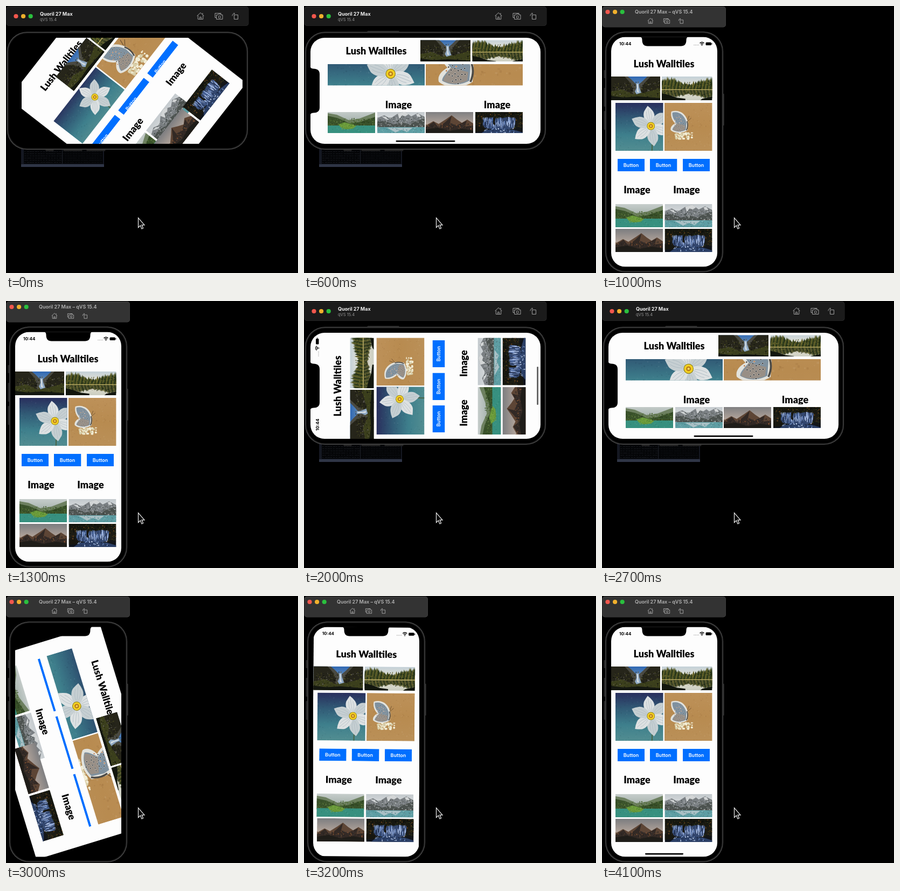
Animation of 542x496 px, one loop 4.4 s. Source, as an HTML page with a canvas:

```html
<!DOCTYPE html>
<html lang="en">
<head>
<meta charset="utf-8">
<title>Rotating phone layout</title>
<style>
html, body { margin: 0; width: 100%; height: 100%; overflow: hidden; background: #000; }
canvas { display: block; }
</style>
</head>
<body>
<canvas id="stage" width="542" height="496"></canvas>
<script>
const ctx = document.getElementById('stage').getContext('2d');
const LOOP = 4400, STEP = 100, TURN = 300;
const DEVICE = 'Quoril 27 Max', SYSTEM = 'qVS 15.4';
const TALL = { x: 115.5, y: 271 }, WIDE = { x: 225.5, y: 157.5 };

// Each phase turns the view; the home bar returns once it has settled.
const phases = [
  { at: 0, start: -135, wide: true, bar: 300 },
  { at: 700, start: 650, wide: false, bar: 1300 },
  { at: 2000, start: 2000, wide: true, bar: 2450 },
  { at: 3000, start: 2914, wide: false, bar: 3600 },
];

const lerp = (a, b, k) => a + (b - a) * k;
const clamp = v => Math.max(0, Math.min(1, v));
const ease = u => (1 - Math.cos(Math.PI * clamp(u))) / 2;

let seed = 1;
const random = () => (seed = seed * 16807 % 2147483647) / 2147483647;

function shape(fill, d) {
  ctx.fillStyle = fill;
  ctx.fill(new Path2D(d));
}

function line(color, width, d) {
  ctx.strokeStyle = color;
  ctx.lineWidth = width;
  ctx.stroke(new Path2D(d));
}

function box(fill, x, y, w, h, r = 0) {
  ctx.fillStyle = fill;
  ctx.beginPath();
  ctx.roundRect(x, y, w, h, r);
  ctx.fill();
}

function dot(fill, x, y, r) {
  ctx.fillStyle = fill;
  ctx.beginPath();
  ctx.arc(x, y, r, 0, 7);
  ctx.fill();
}

function text(str, x, y, font, color, align = 'left') {
  ctx.font = font + ', sans-serif';
  ctx.fillStyle = color;
  ctx.textAlign = align;
  ctx.fillText(str, x, y);
}

function group(draw) {
  ctx.save();
  draw();
  ctx.restore();
}

function clipBox(x, y, w, h) {
  ctx.beginPath();
  ctx.rect(x, y, w, h);
  ctx.clip();
}

function backdrop(w, h, ...colors) {
  const g = ctx.createLinearGradient(0, 0, 0, h);
  colors.forEach((c, i) => g.addColorStop(i / (colors.length - 1), c));
  ctx.fillStyle = g;
  ctx.fillRect(0, 0, w, h);
}

function specks(n, colors, x, y, w, h, size = 1.5) {
  for (let i = 0; i < n; i++) {
    ctx.fillStyle = colors[i % colors.length];
    ctx.fillRect(x + random() * w, y + random() * h, size * random() + .4, size * random() + .4);
  }
}

// Forest edge; a negative height gives its reflection.
function firs(colors, base, height) {
  for (let i = 0; i < 48; i++) {
    const x = i * 2, h = height * (.62 + .24 * Math.cos((x - 8) / 13) + .28 * random());
    shape(colors[i % colors.length], `M${x - 4} ${base}L${x - 2} ${base - h * .6}L${x} ${base - h}L${x + 2} ${base - h * .6}L${x + 4} ${base}Z`);
  }
}

const art = {
  cliff: { w: 92, h: 44, draw() {
    backdrop(92, 44, '#2f68b4', '#6f93b5', '#34362a');
    shape('#4a4a42', 'M0 0H32L39 6L45 12L52 15L60 8L68 0H92V44H0Z');
    shape('#26251a', 'M0 0H26L37 12L42 26L40 44H0ZM92 0H74L62 13L56 25L58 44H92Z');
    shape('#3b3f1c', 'M0 28L22 24L40 33L62 30L92 22V44H0Z');
    specks(260, ['#12140d', '#4e4f22', '#2f311d', '#615f55'], 0, 9, 92, 35, 2);
    shape('#8fa9c4', 'M47 13L52 12L53 20L57 30L48 33L45 28L48 21Z');
    shape('#d5dde2', 'M49 14L51 14L51 23L53 30L49 29Z');
    shape('#141710', 'M0 36L25 39L50 37L92 40V44H0Z');
  } },
  lake: { w: 92, h: 44, draw() {
    backdrop(92, 44, '#c3d0d8', '#ece7d7', '#c9ccc0');
    firs(['#454f22', '#25321a', '#66622b'], 24, 22);
    firs(['#4a5029', '#2c361d', '#5f5c33'], 25, -16);
    specks(200, ['#1a2411', '#7d7633', '#465021'], 0, 10, 92, 25);
    box('#c4b468', 0, 23.6, 92, 1.4);
    shape('#12160e', 'M0 31L13 34L27 39L43 41V44H0ZM92 37L74 41L70 44H92Z');
  } },
  flower: { w: 145, h: 89, draw() {
    backdrop(145, 89, '#292f5d', '#315b76', '#3e7f8c', '#528d91');
    specks(260, ['#ffffff12', '#00002018'], 0, 0, 145, 89, 2);
    line('#4a6648', 2, 'M94 48Q97 68 96 89');
    ctx.translate(94, 43);
    for (let i = 0; i < 6; i++) group(() => {
      ctx.rotate(i * Math.PI / 3 - .16);
      shape(i % 2 ? '#c6cfd2' : '#dde1e2', 'M0 0C-9 -6 -13 -21 -8 -29Q-4 -34 0 -38Q5 -33 8 -27C12 -19 9 -7 0 0Z');
      line('#a9b7bf', .6, 'M0 -8L0 -33M-2 -9Q-6 -18 -4 -28M2 -9Q6 -18 4 -27');
    });
    dot('#8b801d', 0, 0, 7.5);
    dot('#f2cf22', 0, 0, 6.6);
    dot('#b87818', 0, 0, 3.6);
    dot('#f0d75a', 0, 0, 1.8);
  } },
  butterfly: { w: 89, h: 89, draw() {
    backdrop(89, 89, '#bd9159', '#b88b50', '#ba9058');
    specks(160, ['#ffffff12', '#50300014'], 0, 0, 89, 89, 2);
    line('#5c4328', .7, 'M42 34L46 24M42 35L50 28');
    for (let i = 0; i < 60; i++)
      dot(i % 3 ? '#f2edd5' : '#d8cfaa', 21 + random() * 32, 55 + random() * 12, .8 + random() * 1.5);
    shape('#e2e2dc', 'M13 16C29 11 41 21 44 37L43 51C34 57 21 58 12 51C10 45 16 40 20 38C14 32 11 24 13 16Z');
    shape('#7f919f', 'M15 18C27 15 38 23 41 37L40 50C33 54 23 55 15 50C15 46 20 42 23 38C17 31 14 24 15 18Z');
    shape('#988f86', 'M23 38L39 42L38 50C30 54 21 53 16 50C17 45 21 43 23 38Z');
    for (let i = 0; i < 34; i++) {
      const a = i * 2.4, r = 1.55 * Math.sqrt(i);
      const x = 28 + r * Math.cos(a) * 1.1, y = 37 + r * Math.sin(a) * 1.8;
      dot('#d9dcd9', x, y, .9);
      dot(i % 5 ? '#28282b' : '#bf6b31', x, y, .6);
    }
    line('#4c4a46', 1.8, 'M42 34Q45 42 41 51');
  } },
  meadow: { w: 88, h: 43, draw() {
    backdrop(88, 43, '#c6cdcb', '#a3b0aa', '#627b6a');
    shape('#6d8060', 'M0 4L17 7L39 17L59 14L88 3V29H0Z');
    shape('#39512a', 'M0 9L18 13L40 23L58 21L88 11V29H0Z');
    specks(190, ['#2b3f1e', '#4d6a30', '#5c7440'], 0, 13, 88, 15, 2);
    box('#37907f', 0, 27, 88, 16);
    specks(50, ['#4f9f8d', '#2d7d6c'], 0, 28, 88, 14);
    shape('#6a9a3a', 'M20 25L31 21L42 24L53 28L46 33L33 34L24 30Z');
    specks(50, ['#4c7d2c', '#86ab4a'], 24, 23, 25, 10);
  } },
  peaks: { w: 88, h: 43, draw() {
    backdrop(88, 43, '#c3c9cd', '#dde0e1', '#759fa5');
    shape('#7b8084', 'M0 13L13 8L24 14L38 5L51 1L63 10L75 4L88 11V30H0Z');
    shape('#d2d5d6', 'M38 5L51 1L58 6L52 10L46 8L41 15ZM8 10L16 11L22 17L15 15ZM72 6L77 5L82 12L74 10Z');
    shape('#4c524f', 'M0 20L14 18L30 25L46 21L60 25L74 18L88 14V31H0Z');
    specks(220, ['#3a423e', '#8b8f90', '#b4b8b9', '#5d625f'], 0, 10, 88, 20, 2);
    box('#5e9ea4', 0, 30, 88, 13);
    shape('#a9c0c5', 'M18 31H66L55 39L45 35L34 40Z');
    specks(90, ['#447e84', '#8cb8bb', '#5d7f83'], 0, 31, 88, 11);
  } },
  ridge: { w: 88, h: 43, draw() {
    backdrop(88, 43, '#7b7c7f', '#ab9f97', '#d6b496');
    shape('#5d4535', 'M0 27L14 19L24 24L38 15L48 8L58 16L67 22L77 16L88 23V43H0Z');
    shape('#322925', 'M0 30L15 20L24 31L37 20L48 9L45 22L56 27L68 22L76 18L73 29L88 27V43H0Z');
    specks(180, ['#8a5532', '#2a2320', '#54402f', '#3c3430'], 0, 23, 88, 14, 2);
    shape('#1f1d19', 'M0 34L22 31L44 37L67 33L88 36V43H0Z');
  } },
  falls: { w: 88, h: 43, draw() {
    backdrop(88, 43, '#12140e', '#1e1d15', '#0c111c');
    specks(230, ['#403617', '#65401a', '#27351b', '#090b08'], 0, 0, 88, 33, 2.2);
    shape('#33476f', 'M14 15L27 12L45 14L62 11L75 14L72 32L59 35L31 34L16 31Z');
    for (let i = 0; i < 110; i++)
      box(['#b9cbed', '#5472ac', '#8ba6d8', '#1f2b47'][i % 4], 14 + random() * 60, 11 + random() * 14, .5 + random(), 4 + random() * 7);
    shape('#17160f', 'M33 12L38 12L36 20L37 27L33 24ZM0 28L16 30L24 36L0 39Z');
    shape('#2b3f66', 'M20 35L48 33L72 35L88 40V43H9Z');
    specks(60, ['#c3d2ec', '#6f8cc0', '#1b2742'], 16, 31, 58, 9, 2);
  } },
};

function picture({ w, h, draw }, r) {
  clipBox(r.x, r.y, r.w, r.h);
  const s = Math.max(r.w / w, r.h / h);
  ctx.translate(r.x + r.w / 2, r.y + r.h / 2);
  ctx.scale(s, s);
  ctx.translate(-w / 2, -h / 2);
  seed = 77;
  draw();
}

function heading(str, r) {
  clipBox(r.x, r.y, r.w, r.h);
  text(str, r.x + r.w / 2, r.y + r.h / 2 + 6, '900 18px Lato', '#000', 'center');
}

// The label keeps its place from the top left corner while the button flattens.
function button(r) {
  clipBox(r.x, r.y, r.w, r.h);
  box('#006fff', r.x, r.y, r.w, r.h);
  text('Button', r.x + 25, r.y + 14.7, '600 9px Inter', '#fff', 'center');
}

// Draw call, then x y w h in the tall and in the wide layout.
const image = name => r => picture(art[name], r);
const label = str => r => heading(str, r);
const layout = [
  [label('Lush Walltiles'), [45, 92, 140, 32], [64, 68, 140, 32]],
  [image('cliff'), [16, 131, 92, 44], [216, 63.5, 93, 39.5]],
  [image('lake'), [111, 131, 93.5, 44], [312.5, 63.5, 93.5, 39.5]],
  [image('flower'), [25, 180, 88.5, 89], [44, 108, 180, 39.5]],
  [image('butterfly'), [116, 180, 88.5, 89], [226, 108, 180, 39.5]],
  [button, [29, 284, 50, 23], [44, 160.5, 114, 0]],
  [button, [89, 284, 50.5, 23], [168, 160.5, 114, 0]],
  [button, [150, 284, 50, 23], [292, 160.5, 114, 0]],
  [label('Image'), [30, 326, 70, 32], [140.5, 176, 70, 16]],
  [label('Image'), [122, 326, 70, 32], [323.5, 176, 70, 16]],
  [image('meadow'), [25, 368, 88, 43], [44, 197, 88, 39]],
  [image('peaks'), [116.5, 368, 88, 43], [136, 197, 88, 39]],
  [image('ridge'), [25, 414, 88, 43], [226, 197, 88, 39]],
  [image('falls'), [116.5, 414, 88, 43], [318, 197, 88, 39]],
];

function statusBar() {
  text('10:44', -83.5, -198, '700 8px Inter', '#000');
  for (let i = 0; i < 4; i++) dot('#999', 55.5 + i * 2.6, -198.5, .7);
  line('#000', 1.4, 'M66 -202Q70 -205.5 74 -202M67.8 -200Q70 -202 72.2 -200');
  dot('#000', 70, -198.2, 1);
  box('#000', 77, -203.5, 10.5, 5.5, 1.5);
  box('#000', 88, -202, 1, 2.5);
}

function view(k, barAlpha) {
  const w = lerp(197, 427, k), h = lerp(427, 197, k);
  box('#fdfdfd', -w / 2, -h / 2, w, h);
  for (const [draw, tall, wide] of layout) {
    const [x, y, rw, rh] = tall.map((v, i) => lerp(v, wide[i], k));
    group(() => draw({ x: x - lerp(TALL.x, WIDE.x, k), y: y - lerp(TALL.y, WIDE.y, k), w: rw, h: rh }));
  }
  group(() => {
    ctx.globalAlpha = clamp(1 - 3 * k);
    statusBar();
  });
  group(() => {
    ctx.globalAlpha = barAlpha;
    const half = lerp(35.5, 55, k);
    box('#000', -half, lerp(206.8, 92.3, k), half * 2, 2.6, 1.3);
  });
}

function phone(wide, p, barAlpha) {
  const { x, y } = wide ? WIDE : TALL;
  ctx.translate(x, y);
  if (wide) ctx.rotate(-Math.PI / 2);
  for (const [by, bh] of [[-152, 15], [-119, 35], [-76, 35]]) box('#242424', -112, by, 4, bh, 1);
  box('#242424', 108, -108, 3.5, 59, 1);
  box('#4b4b4b', -109.5, -223.5, 219, 447, 37);
  box('#161616', -108.3, -222.3, 216.6, 444.6, 36);
  box('#000', -106.5, -220.5, 213, 441, 34);
  group(() => {
    ctx.beginPath();
    ctx.roundRect(-98.5, -213.5, 197, 427, 26);
    ctx.clip();
    group(() => {
      ctx.rotate((wide ? p : 1 - p) * Math.PI / 2);
      view(wide ? p : 1 - p, barAlpha);
    });
    shape('#000', 'M-45 -214Q-41 -213 -41 -208Q-41 -196.5 -31 -196.5H31Q41 -196.5 41 -208Q41 -213 45 -214Z');
  });
}

const icons = [
  'M-6.5 0L0 -6L6.5 0M-4.7 -1V6H4.7V-1M-1.3 6V2H1.3V6M4 -3V-5.5',
  'M-5 3H-7V-5H4V-3M-4.5 -2H-1.5L-.5 -3.5H3L4 -2H7V6H-4.5ZM3.4 2A2.1 2.1 0 1 1 -.8 2A2.1 2.1 0 1 1 3.4 2',
  'M-2.5 -2H4.5V6H-2.5ZM-6 0Q-6 -4.5 -1.5 -4.5M-3 -6L-1.5 -4.5L-3 -3',
];

function toolbar(wide) {
  const [w, h, lx, ly] = wide ? [450, 36, 18.5, 19] : [229.5, 38.5, 10.5, 11];
  box(wide ? '#2b2b2b' : '#464646', .5, 1, w, h, 5);
  box(wide ? '#1b1b1b' : '#333', 1, 1.8, w - 1, h - 1.4, 5);
  ['#f2574d', '#f0b02c', '#2ac03e'].forEach((c, i) => dot(c, lx + i * 13.6, ly, 4.1));
  if (wide) {
    text(DEVICE, 63, 18, '700 9px Inter', '#f0f0f0');
    text(SYSTEM, 63, 27.5, '400 7.5px Inter', '#949494');
  } else {
    text(`${DEVICE} – ${SYSTEM}`, 61, 14, '600 9px Inter', '#b5b5b5');
  }
  (wide ? [361, 395, 426] : [90, 120, 147]).forEach((x, i) => group(() => {
    ctx.translate(x, wide ? 18.5 : 27.5);
    if (!wide) ctx.scale(.8, .8);
    line(wide ? '#a0a0a0' : '#b5b5b5', 1, icons[i]);
  }));
}

// Edge of a dim window that shows below the wide phone.
function windowBehind() {
  box('#151822', 28, 262, 154, 37);
  box('#040507', 33, 262, 147, 31);
  box('#2f3546', 28, 294, 154, 5);
  seed = 5;
  for (let y = 270; y < 293; y += 4)
    for (let x = 34; x < 176; x += 5) box(x < 104 ? '#16181d' : '#0d0f13', x, y, 2 + 3 * random(), 1);
  box('#1d2028', 104, 266, 1, 27);
}

function render(t) {
  const { start, wide, bar } = phases.findLast(ph => ph.at <= t);
  const p = ease((t - start) / TURN);
  const barAlpha = Math.max(clamp((t - bar) / 200), .65 * clamp(1 - 5 * p));
  ctx.fillStyle = '#000';
  ctx.fillRect(0, 0, 542, 496);
  if (wide) windowBehind();
  group(() => phone(wide, p, barAlpha));
  toolbar(wide);
  const arrow = 'M245.5 393.5V411.5L249.3 407.8L252 414L254.6 412.8L252 406.8H257Z';
  shape('#080808', arrow);
  line('#eee', 1.2, arrow);
}

let shown = -1;
function tick() {
  const t = Math.floor(performance.now() % LOOP / STEP) * STEP;
  if (t !== shown) render(shown = t);
  requestAnimationFrame(tick);
}
tick();
</script>
</body>
</html>
```
